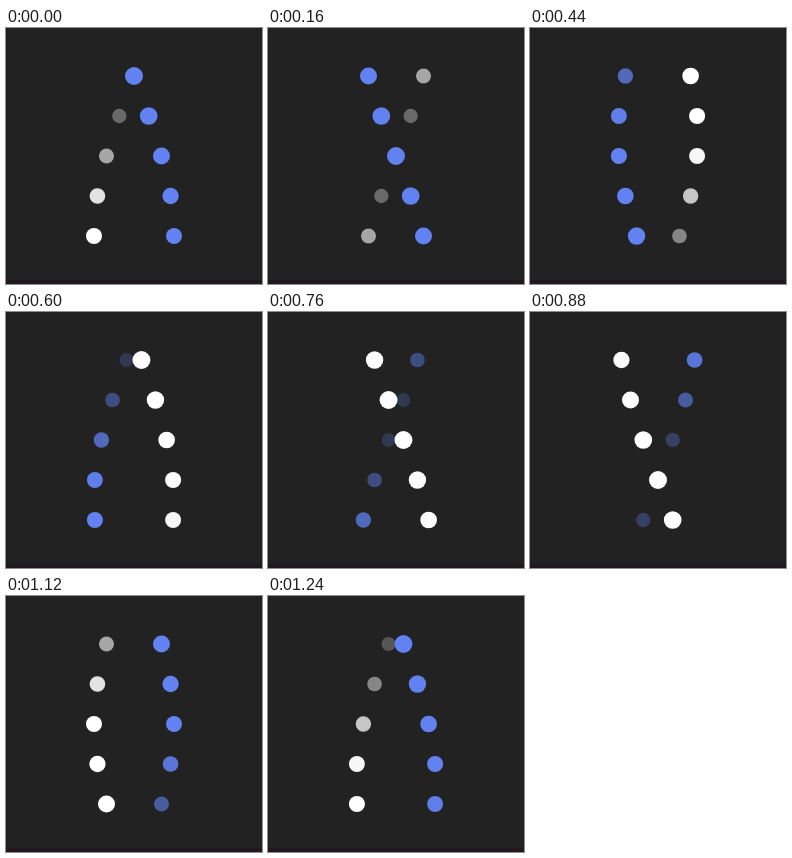
Recreate the animation shown at these times as an HTML page with a canvas. Size 256 by 256 pixels, loop 1280 ms.

```html
<!DOCTYPE html>
<html lang="en">
<head>
<meta charset="utf-8">
<title>Double helix loader</title>
<style>
html, body { margin: 0; width: 100%; height: 100%; overflow: hidden; background: #222; }
canvas { display: block; width: 256px; height: 256px; }
</style>
</head>
<body>
<canvas id="stage" width="256" height="256"></canvas>
<script>
const ctx = document.getElementById('stage').getContext('2d');
const LOOP = 1280, TICK = 40;
const ROWS = 5, TURN = 16;
const BLUE = '#6182f0', WHITE = '#fff';

const smooth = s => s * s * (3 - 2 * s);

// Phase 0 is nearest to the viewer, +-8 is farthest, +-4 are the sides.
function dotAt(phase, row, color) {
  const p = ((phase + 8) % TURN + TURN) % TURN - 8;
  const depth = Math.abs(p);
  const side = depth > 4 ? Math.sign(p) * 8 - p : p;
  const swell = smooth(Math.abs(4 - depth) / 4);
  return {
    color, depth,
    x: 88 + 80 * smooth((side + 4) / 8),
    y: 48 + 40 * row,
    r: depth < 4 ? 8 + swell : 8 - swell,
    alpha: depth < 4 ? 1 : 1 - 0.8 * swell
  };
}

function drawDot(dot) {
  ctx.globalAlpha = dot.alpha;
  ctx.fillStyle = dot.color;
  ctx.beginPath();
  ctx.arc(dot.x, dot.y, dot.r, 0, Math.PI * 2);
  ctx.fill();
}

function render(time) {
  const turned = Math.floor(time % LOOP / TICK) * TICK / LOOP * TURN;
  ctx.globalAlpha = 1;
  ctx.fillStyle = '#222';
  ctx.fillRect(0, 0, 256, 256);
  ctx.fillStyle = '#21191d';
  ctx.fillRect(0, 252, 256, 4);
  for (let row = 0; row < ROWS; row++) {
    const phase = row - turned;
    [dotAt(phase, row, BLUE), dotAt(phase + 8, row, WHITE)]
      .sort((a, b) => b.depth - a.depth)
      .forEach(drawDot);
  }
}

const start = performance.now();
function loop() {
  render(performance.now() - start);
  requestAnimationFrame(loop);
}
loop();
</script>
</body>
</html>
```
